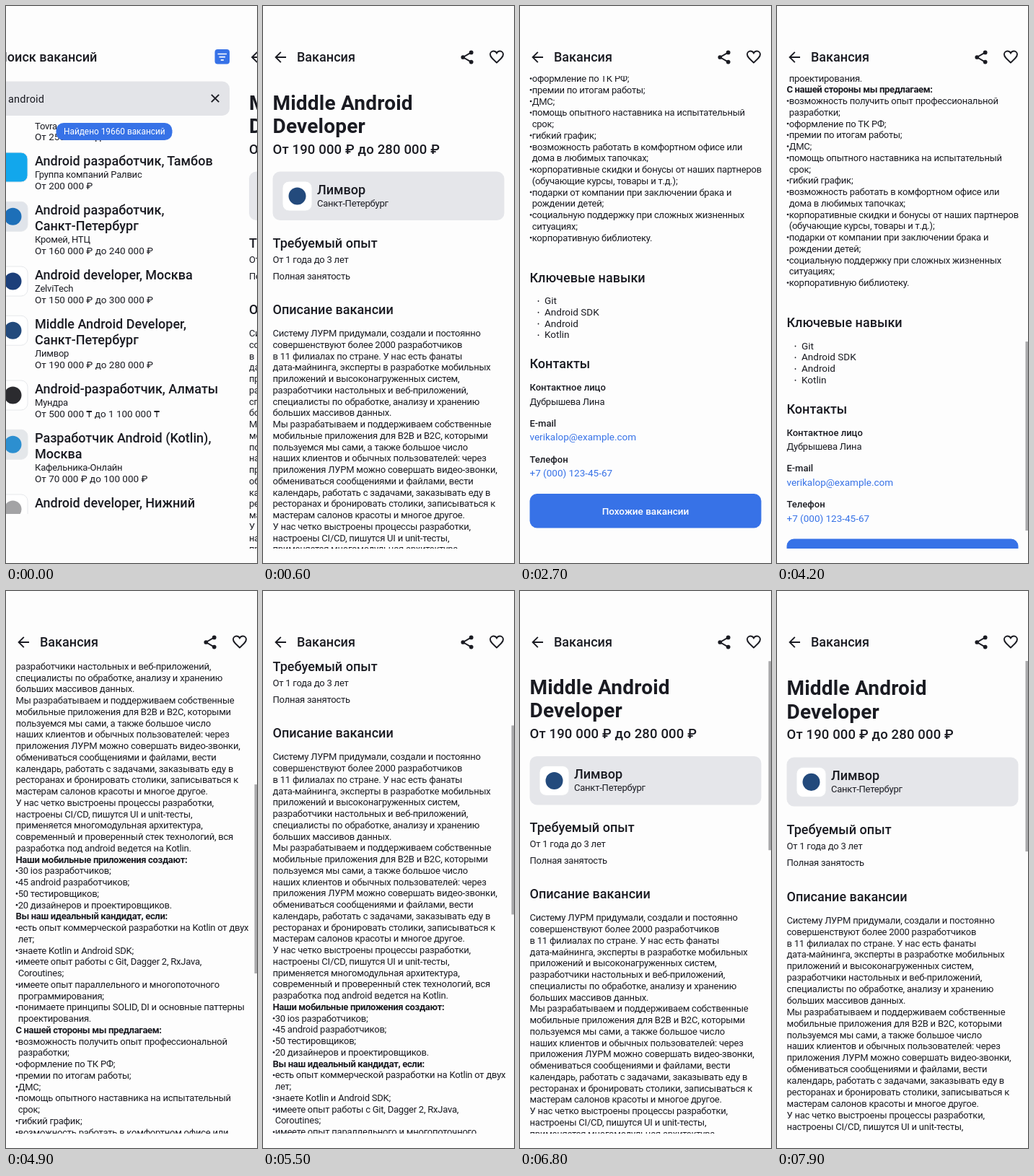
Animation, 348 px wide and 772 px high, one loop 8000 ms. Source, as an HTML page:

```html
<!DOCTYPE html>
<html lang="ru">
<head>
<meta charset="utf-8">
<style>
  html, body { margin: 0; width: 100%; height: 100%; overflow: hidden; background: #fdfdfd; }
  #stage { display: block; width: 348px; height: 772px; }
  text { font-family: Roboto, "Noto Sans", sans-serif; fill: #1a1b22; white-space: pre; }
  .body { font-size: 13px; letter-spacing: -.22px; }
  .bold { font-size: 13px; letter-spacing: -.34px; font-weight: 700; }
  .label { font-size: 13px; font-weight: 500; }
  .sum { font-size: 13.5px; }
  .head { font-size: 18px; font-weight: 500; }
  .pay { font-size: 18.5px; letter-spacing: .15px; font-weight: 500; }
  .title { font-size: 28px; letter-spacing: .2px; font-weight: 700; }
  .query { font-size: 14.5px; letter-spacing: .2px; }
  .toast { font-size: 11.85px; fill: #fff; }
  .link { font-size: 13.5px; fill: #3772e7; }
  .button { font-size: 13.5px; font-weight: 500; fill: #fff; text-anchor: middle; }
  .icon { fill: none; stroke: #1a1b22; stroke-width: 1.9; }
</style>
</head>
<body>
<svg id="stage" viewBox="0 0 348 772">
  <rect width="348" height="772" fill="#fdfdfd"/>
  <g id="search">
    <text class="head" x="13.5" y="77">Поиск вакансий</text>
    <rect x="314" y="60" width="20.5" height="20.5" rx="4" fill="#3772e7"/>
    <path d="M318 66.5h12.5M320 70.7h8.5M322.300 74.900h4" stroke="#fff" stroke-width="1.7"/>
    <rect x="13.5" y="104.500" width="321" height="47.500" rx="10" fill="#e3e4e8"/>
    <text class="query" x="27.5" y="134">android</text>
    <path class="icon" d="M309.300 122.800l10.400 10.400m0-10.400l-10.400 10.400"/>
    <svg id="list" y="160" width="348" height="544" viewBox="0 160 348 544"></svg>
    <rect x="94" y="162" width="161" height="24" rx="10.500" fill="#3772e7"/>
    <text class="toast" x="104.500" y="178.300">Найдено 19660 вакансий</text>
  </g>
  <g id="vacancy">
    <path class="icon" d="M32 71H18M24.800 63.800L17.600 71l7.200 7.200"/>
    <text class="head" x="47" y="77">Вакансия</text>
    <path class="icon" d="M288.700 64.400L277.300 71l11.400 6.600"/>
    <g fill="#1a1b22">
      <circle cx="277.300" cy="71" r="2.850"/>
      <circle cx="288.700" cy="64.400" r="2.850"/>
      <circle cx="288.700" cy="77.600" r="2.850"/>
    </g>
    <path class="icon" transform="translate(312 58.500)" d="M12 20L10.600 18.700C5.800 14.400 3 11.800 3 8.500C3 6 5 4 7.500 4C9.200 4 11 5 12 6.800C13 5 14.800 4 16.500 4C19 4 21 6 21 8.500C21 11.800 18.200 14.400 13.400 18.700Z"/>
    <svg y="97" width="348" height="655" viewBox="0 97 348 655">
      <g id="stretch">
        <g id="page"></g>
        <rect id="bar" x="344.500" width="3.500" height="262" fill="#a9a9ab"/>
      </g>
    </svg>
  </g>
</svg>
<script>
const $ = id => document.getElementById(id);
const LEFT = 13.5, TOP = 97, VIEW = 655, CONTENT = 1638, PITCH = 15.75;

const text = (cls, x, y, s) => `<text class="${cls}" x="${x}" y="${y}">${s}</text>`;
const tile = (x, y, back, mark) =>
  `<rect x="${x}" y="${y}" width="41" height="41" rx="9" fill="${back}" stroke="#e6e8eb"/>` +
  (mark ? `<circle cx="${x + 20.5}" cy="${y + 20.5}" r="12" fill="${mark}"/>` : '');

// Search results: title lines, company, salary, tile colour, mark colour
const jobs = [
  [['Android разработчик, Тамбов'], 'Группа компаний Ралвис', 'От 200 000 ₽', '#12a7ec'],
  [['Android разработчик,', 'Санкт-Петербург'], 'Кромей, НТЦ', 'От 160 000 ₽ до 240 000 ₽', '#e0e4ea', '#1d6fb8'],
  [['Android developer, Москва'], 'ZelviTech', 'От 150 000 ₽ до 300 000 ₽', '#fff', '#1c3f7a'],
  [['Middle Android Developer,', 'Санкт-Петербург'], 'Лимвор', 'От 190 000 ₽ до 280 000 ₽', '#fff', '#234a7c'],
  [['Android-разработчик, Алматы'], 'Мундра', 'От 500 000 ₸ до 1 100 000 ₸', '#fff', '#2b2b2f'],
  [['Разработчик Android (Kotlin),', 'Москва'], 'Кафельника-Онлайн', 'От 70 000 ₽ до 100 000 ₽', '#e4e7ea', '#2c8fd0'],
  [['Android developer, Нижний', 'Новгород'], '', '', '#fff', '#a3a3a5']
];

function buildList() {
  const x = 64.5;
  let out = text('body', x, 170.5, 'Tovra') + text('sum', x, 186, 'От 250 000 ₽ до 420 000 ₽');
  let y = 214;
  for (const [lines, firm, sum, back, mark] of jobs) {
    out += tile(LEFT, y - 11, back, mark);
    lines.forEach((s, i) => out += text('head', x, y + 6.5 + i * 22, s));
    const last = y + (lines.length - 1) * 22;
    out += text('body', x, last + 24, firm) + text('sum', x, last + 40, sum);
    y += lines.length > 1 ? 89.75 : 68.25;
  }
  $('list').innerHTML = out;
}

// '#' marks a bold line, '*' a bullet, '_' the continuation of a bullet
const story = `Систему ЛУРМ придумали, создали и постоянно
совершенствуют более 2000 разработчиков
в 11 филиалах по стране. У нас есть фанаты
дата-майнинга, эксперты в разработке мобильных
приложений и высоконагруженных систем,
разработчики настольных и веб-приложений,
специалисты по обработке, анализу и хранению
больших массивов данных.
Мы разрабатываем и поддерживаем собственные
мобильные приложения для B2B и B2C, которыми
пользуемся мы сами, а также большое число
наших клиентов и обычных пользователей: через
приложения ЛУРМ можно совершать видео-звонки,
обмениваться сообщениями и файлами, вести
календарь, работать с задачами, заказывать еду в
ресторанах и бронировать столики, записываться к
мастерам салонов красоты и многое другое.
У нас четко выстроены процессы разработки,
настроены CI/CD, пишутся UI и unit-тесты,
применяется многомодульная архитектура,
современный и проверенный стек технологий, вся
разработка под android ведется на Kotlin.
#Наши мобильные приложения создают:
*30 ios разработчиков;
*45 android разработчиков;
*50 тестировщиков;
*20 дизайнеров и проектировщиков.
#Вы наш идеальный кандидат, если:
*есть опыт коммерческой разработки на Kotlin от двух
_лет;
*знаете Kotlin и Android SDK;
*имеете опыт работы с Git, Dagger 2, RxJava,
_Coroutines;
*имеете опыт параллельного и многопоточного
_программирования;
*понимаете принципы SOLID, DI и основные паттерны
_проектирования.
#С нашей стороны мы предлагаем:
*возможность получить опыт профессиональной
_разработки;
*оформление по ТК РФ;
*премии по итогам работы;
*ДМС;
*помощь опытного наставника на испытательный
_срок;
*гибкий график;
*возможность работать в комфортном офисе или
_дома в любимых тапочках;
*корпоративные скидки и бонусы от наших партнеров
_(обучающие курсы, товары и т.д.);
*подарки от компании при заключении брака и
_рождении детей;
*социальную поддержку при сложных жизненных
_ситуациях;
*корпоративную библиотеку.`;

const dot = (x, y, r) => `<circle cx="${x}" cy="${y}" r="${r}" fill="#1a1b22"/>`;

function storyLine(s, i) {
  const y = 458 + i * PITCH, kind = s[0];
  if (kind === '#') return text('bold', LEFT, y, s.slice(1));
  if (kind === '*') return dot(15, y - 4.5, 1.35) + text('body', 16.7, y, s.slice(1));
  if (kind === '_') return text('body', 16.7, y, s.slice(1));
  return text('body', LEFT, y, s);
}

function buildPage() {
  const skills = ['Git', 'Android SDK', 'Android', 'Kotlin'];
  $('page').innerHTML =
    text('title', LEFT, 144, 'Middle Android') +
    text('title', LEFT, 176, 'Developer') +
    text('pay', LEFT, 204.5, 'От 190 000 ₽ до 280 000 ₽') +
    `<rect x="${LEFT}" y="229.5" width="321" height="67.5" rx="10" fill="#e5e6ea"/>` +
    tile(27, 243, '#fff', '#234a7c') +
    text('head', 75, 260.5, 'Лимвор') +
    text('body', 75, 278, 'Санкт-Петербург') +
    text('head', LEFT, 335, 'Требуемый опыт') +
    text('body', LEFT, 356, 'От 1 года до 3 лет') +
    text('body', LEFT, 379, 'Полная занятость') +
    text('head', LEFT, 427, 'Описание вакансии') +
    story.split('\n').map(storyLine).join('') +
    text('head', LEFT, 1365.5, 'Ключевые навыки') +
    skills.map((s, i) => {
      const y = 1396 + i * PITCH;
      return dot(25.5, y - 4, .9) + text('sum', 34, y, s);
    }).join('') +
    text('head', LEFT, 1485, 'Контакты') +
    text('label', LEFT, 1516, 'Контактное лицо') +
    text('body', LEFT, 1535.5, 'Дубрышева Лина') +
    text('label', LEFT, 1565.5, 'E-mail') +
    text('link', LEFT, 1585, 'verikalop@example.com') +
    text('label', LEFT, 1615.5, 'Телефон') +
    text('link', LEFT, 1635, '+7 (000) 123-45-67') +
    `<rect x="${LEFT}" y="1659" width="321" height="47.5" rx="10" fill="#3772e7"/>` +
    text('button', 174, 1687.5, 'Похожие вакансии');
}

// Moves: start, end, from, to, power of the slowing down
const scrolls = [
  [1400, 2300, 0, 983, 3.23],
  [4100, 4200, 983, 920.5, 1],
  [4200, 5000, 920.5, 420, 2],
  [5000, 5200, 420, 417, 1],
  [5300, 6200, 417, 44, 2.91],
  [6200, 7100, 44, 0, 3.9]
];
const clamp = v => Math.min(1, Math.max(0, v));
const ease = (t, [t0, t1, a, b, k]) => a + (b - a) * (1 - (1 - clamp((t - t0) / (t1 - t0))) ** k);
const scrollAt = t => ease(t, scrolls.filter(m => t >= m[0]).pop() || scrolls[0]);
const slideAt = t => ease(t, [0, 600, 24.5, 348, 2.3]);

function barAlpha(t) {
  if (t < 1500) return 0;
  return t < 4200 ? 1 - clamp((t - 2300) / 400) : 1;
}

function draw(t) {
  const slide = slideAt(t), y = scrollAt(t);
  const pull = ease(t, [7400, 7900, 1, 1.0078, 1.5]);
  $('search').setAttribute('transform', `translate(${-slide} 0)`);
  $('vacancy').setAttribute('transform', `translate(${348 - slide} 0)`);
  $('page').setAttribute('transform', `translate(0 ${-y})`);
  $('stretch').setAttribute('transform', `translate(0 ${TOP}) scale(1 ${pull}) translate(0 ${-TOP})`);
  $('bar').setAttribute('y', TOP + y * VIEW / CONTENT);
  $('bar').setAttribute('opacity', barAlpha(t));
}

buildList();
buildPage();
const start = performance.now();
function tick() {
  const t = (performance.now() - start) % 8000;
  draw(Math.floor(t / 100) * 100); // the screen refreshes ten times a second
  requestAnimationFrame(tick);
}
draw(0);
requestAnimationFrame(tick);
</script>
</body>
</html>
```
